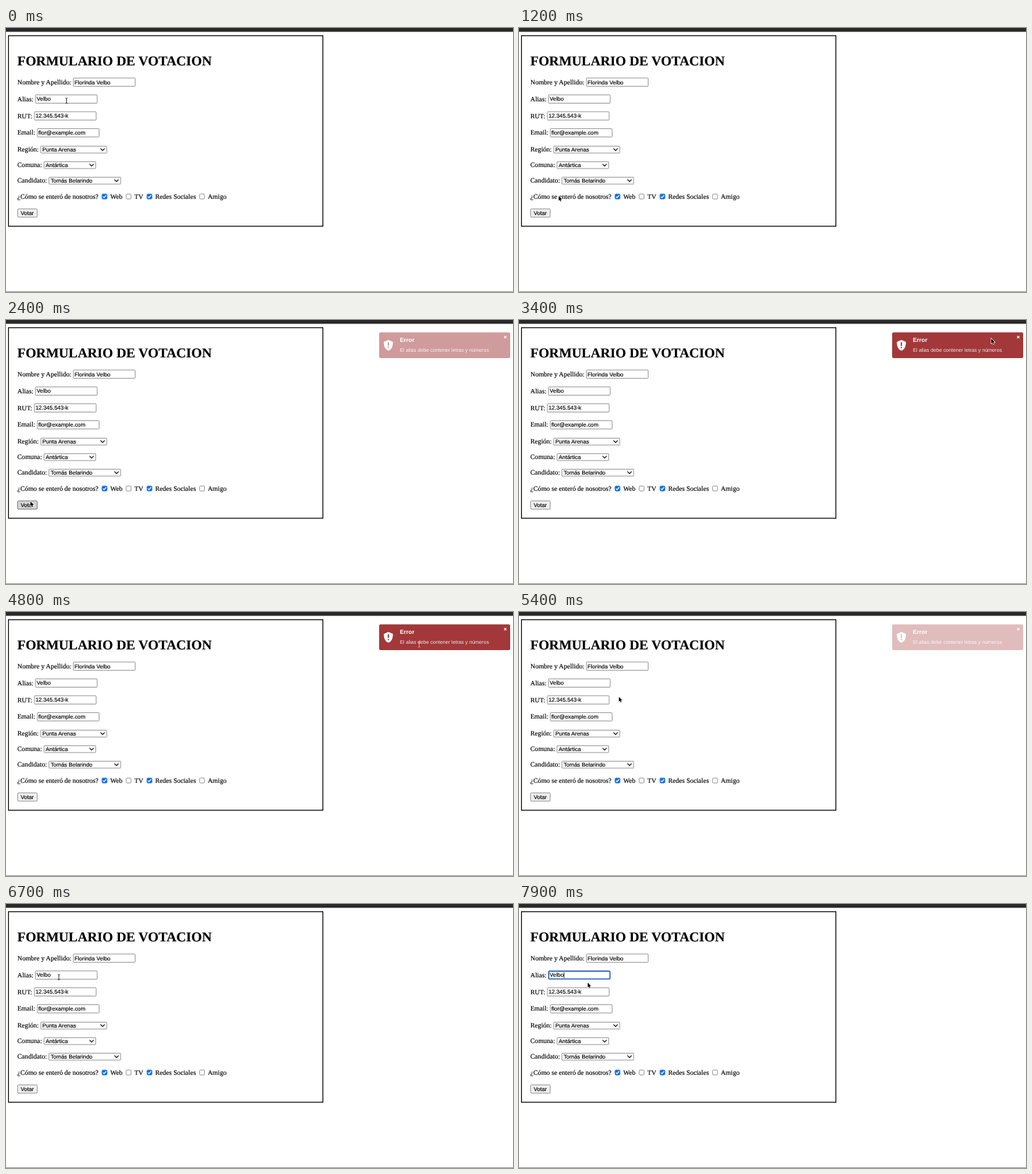
Animation of 716x374 px, one loop 8 s. Source, as an HTML page with a canvas:

```html
<!DOCTYPE html>
<html lang="es">
<head>
<meta charset="utf-8">
<title>Formulario de votación</title>
<style>
html, body { margin: 0; width: 100%; height: 100%; overflow: hidden; background: #fff; }
canvas { display: block; width: 716px; height: 374px; }
</style>
</head>
<body>
<canvas id="stage"></canvas>
<script>
const W = 716, H = 374, LOOP = 8000, STEP = 100;
const S = .597;               // page zoom: one CSS pixel of the form
const EM = 16 * S, GAP = 4 * S, LEFT = 16;
const SERIF = '"Liberation Serif", serif';
const SANS = '"Liberation Sans", sans-serif';
const BORDER = '#7d7d7d', BLUE = '#1470dc';

const canvas = document.getElementById('stage');
const dpr = window.devicePixelRatio || 1;
canvas.width = W * dpr;
canvas.height = H * dpr;
const ctx = canvas.getContext('2d');

const inputs = [
  { name: 'Nombre y Apellido:', val: 'Florinda Velbo' },
  { name: 'Alias:', val: 'Velbo' },
  { name: 'RUT:', val: '12.345.543-k' },
  { name: 'Email:', val: 'flor@example.com' }
];
const selects = [
  { name: 'Región:', val: 'Punta Arenas', w: 94 },
  { name: 'Comuna:', val: 'Antártica', w: 73.7 },
  { name: 'Candidato:', val: 'Tomás Belarindo', w: 102 }
];
const checks = [['Web', true], ['TV', false], ['Redes Sociales', true], ['Amigo', false]];

// pointer stops: arrival, departure, x, y
const stops = [
  [0, 100, 85.5, 103],
  [1200, 1200, 56, 238],
  [1800, 2900, 34.5, 257],
  [3400, 3400, 667, 26.5],
  [4300, 4300, 66, 196],
  [4800, 4800, 583.5, 46],
  [5100, 5200, 217, 127],
  [5600, 5600, 65, 113.5],
  [7000, 7700, 76, 102.3],
  [7900, LOOP, 97, 111.5]
];

const clamp = v => Math.min(1, Math.max(0, v));
const ease = p => p * p * (3 - 2 * p);
const inside = (px, py, { x, y, w, h }) => px >= x && px <= x + w && py >= y && py <= y + h;

function pointerAt(t) {
  const i = stops.findLastIndex(s => s[0] <= t);
  const [, leave, x, y] = stops[i];
  const [arrive, , nx, ny] = stops[i + 1] || [LOOP + 1, 0, x, y];
  const p = ease(clamp((t - leave) / (arrive - leave)));
  return [x + (nx - x) * p, y + (ny - y) * p];
}

function setFont(size, family, weight = 'normal') {
  ctx.font = `${weight} ${size}px ${family}`;
  ctx.textRendering = 'geometricPrecision';
}

// Draws text slightly thickened and returns its right edge.
function text(s, x, y, size, family, color = '#000', weight) {
  setFont(size, family, weight);
  ctx.fillStyle = ctx.strokeStyle = color;
  ctx.lineWidth = .15;
  ctx.fillText(s, x, y);
  if (color === '#000') ctx.strokeText(s, x, y);
  return x + ctx.measureText(s).width;
}

const label = (s, x, y) => text(s, x, y, EM, SERIF);
const value = (s, x, y) => text(s, x, y, 13.333 * S, SANS);

function box(x, y, w, h, r, fill, stroke, line = .8) {
  ctx.beginPath();
  ctx.roundRect(x, y, w, h, r);
  if (fill) { ctx.fillStyle = fill; ctx.fill(); }
  if (stroke) { ctx.strokeStyle = stroke; ctx.lineWidth = line; ctx.stroke(); }
}

// Box whose border lies inside the given edges.
function frame({ x, y, w, h }, r, fill, stroke, line = .8) {
  box(x + line / 2, y + line / 2, w - line, h - line, r, fill, stroke, line);
}

function polyline(points, color, width) {
  ctx.beginPath();
  points.forEach(([x, y]) => ctx.lineTo(x, y));
  ctx.strokeStyle = color;
  ctx.lineWidth = width;
  ctx.stroke();
}

// Rows sit at an even pitch; each field follows its label and a space.
function layout(fields, top, pitch, size) {
  setFont(EM, SERIF);
  fields.forEach((f, i) => Object.assign(f, {
    x: LEFT + ctx.measureText(f.name).width + GAP,
    y: top + pitch * i,
    ...size
  }));
}
layout(inputs, 70.5, 23.9, { w: 88, h: 12.5 });
layout(selects, 167, 22, { h: 10.5 });
const button = { x: 16, y: 255.8, w: 28.5, h: 12.6 };
const message = { x: 556, y: 38, w: 127, h: 10 };

function drawInput(f, focused) {
  label(f.name, LEFT, f.y + 9.2);
  frame(f, .8, '#fff', BORDER);
  if (focused) frame(f, 1.5, null, '#2463c4', 1.5);
  const end = value(f.val, f.x + 2, f.y + 9) + .6;
  if (focused) polyline([[end, f.y + 2.3], [end, f.y + 10.4]], '#000', .8);
}

function drawSelect(f) {
  label(f.name, LEFT, f.y + 8);
  frame(f, .5, '#fff', BORDER);
  value(f.val, f.x + 2.6, f.y + 8);
  const cx = f.x + f.w - 6.2, cy = f.y + 3.6;
  polyline([[cx - 3, cy], [cx, cy + 3], [cx + 3, cy]], '#111', 1.2);
}

function drawChecks() {
  const base = 242.4, y = 234.8, size = 13 * S;
  let end = label('¿Cómo se enteró de nosotros?', LEFT, base);
  for (const [name, on] of checks) {
    const x = end + 2 * GAP;
    frame({ x, y, w: size, h: size }, 1.3, on ? BLUE : '#fff', on ? BLUE : BORDER);
    if (on) polyline([[x + 1.7, y + 4.1], [x + 3.2, y + 5.6], [x + 6.2, y + 2]], '#fff', 1.2);
    end = label(name, x + size + 1.75 * GAP, base);
  }
}

// White parts stay opaque: over the white page this equals fading the whole card.
function drawToast(alpha) {
  if (alpha <= 0) return;
  const red = `rgba(162, 56, 58, ${alpha})`;
  box(527, 17.5, 185, 36.5, 2, red);
  ctx.beginPath();
  ctx.moveTo(540, 28.3);
  ctx.lineTo(546.4, 30.9);
  ctx.bezierCurveTo(546.6, 37, 544.5, 41.6, 540, 43.6);
  ctx.bezierCurveTo(535.5, 41.6, 533.4, 37, 533.6, 30.9);
  ctx.fillStyle = '#fff';
  ctx.fill();
  polyline([[540, 31.5], [540, 36.8]], red, 1.8);
  box(539, 38, 2, 2, 1, red);
  text('Error', 556.3, 31.3, 14 * S, SANS, '#fff', 'bold');
  text('El alias debe contener letras y números', 556.3, 45, 12 * S, SANS, 'rgba(255, 255, 255, .87)');
  for (const d of [-1.6, 1.6]) polyline([[705.1 - d, 22.7], [705.1 + d, 25.9]], '#fff', 1.1);
}

function drawArrow(x, y) {
  ctx.beginPath();
  [[0, 0], [0, 6.7], [1.5, 5.3], [2.6, 7.8], [3.8, 7.3], [2.7, 4.9], [4.8, 4.8]]
    .forEach(([dx, dy]) => ctx.lineTo(x + dx, y + dy));
  ctx.closePath();
  ctx.strokeStyle = '#fff';
  ctx.lineWidth = 1.2;
  ctx.stroke();
  ctx.fillStyle = '#000';
  ctx.fill();
}

function drawBeam(x, y, color) {
  polyline([[x, y - 3.4], [x, y + 3.4]], color, .9);
  for (const s of [-1, 1]) {
    polyline([[x - 1.7, y + 4 * s], [x, y + 3.3 * s], [x + 1.7, y + 4 * s]], color, .8);
  }
}

function drawPointer(x, y, toast) {
  if (toast > 0 && inside(x, y, message)) drawBeam(x, y, '#d9b9a8');
  else if (inputs.some(f => inside(x, y, f))) drawBeam(x, y, '#222');
  else drawArrow(x, y);
}

function draw(t) {
  const [px, py] = pointerAt(t);
  const toast = clamp((t - 2250) / 300) * clamp((5500 - t) / 300);
  const hover = inside(px, py, button);

  ctx.setTransform(dpr, 0, 0, dpr, 0, 0);
  ctx.fillStyle = '#fff';
  ctx.fillRect(0, 0, W, H);
  ctx.fillStyle = '#2a292a';
  ctx.fillRect(0, 0, W, 5.4);
  ctx.fillStyle = '#9a9a9a';
  ctx.fillRect(0, 373, W, 1);

  box(3.5, 10.9, 444, 270, 0, null, '#000', 2 * S);
  text('FORMULARIO DE VOTACION', LEFT, 53.2, 2 * EM + .07, SERIF, '#000', 'bold');
  inputs.forEach((f, i) => drawInput(f, i === 1 && t >= 7600));
  selects.forEach(drawSelect);
  drawChecks();
  frame(button, 1.3, hover ? '#d6d6d6' : '#efefef', hover ? '#5c5c5c' : BORDER);
  value('Votar', button.x + 4.7, button.y + 9);

  drawToast(toast);
  drawPointer(px, py, toast);
}

const start = performance.now();
function tick() {
  const t = (performance.now() - start) % LOOP;
  draw(Math.floor(t / STEP) * STEP);
  requestAnimationFrame(tick);
}
tick();
</script>
</body>
</html>
```
